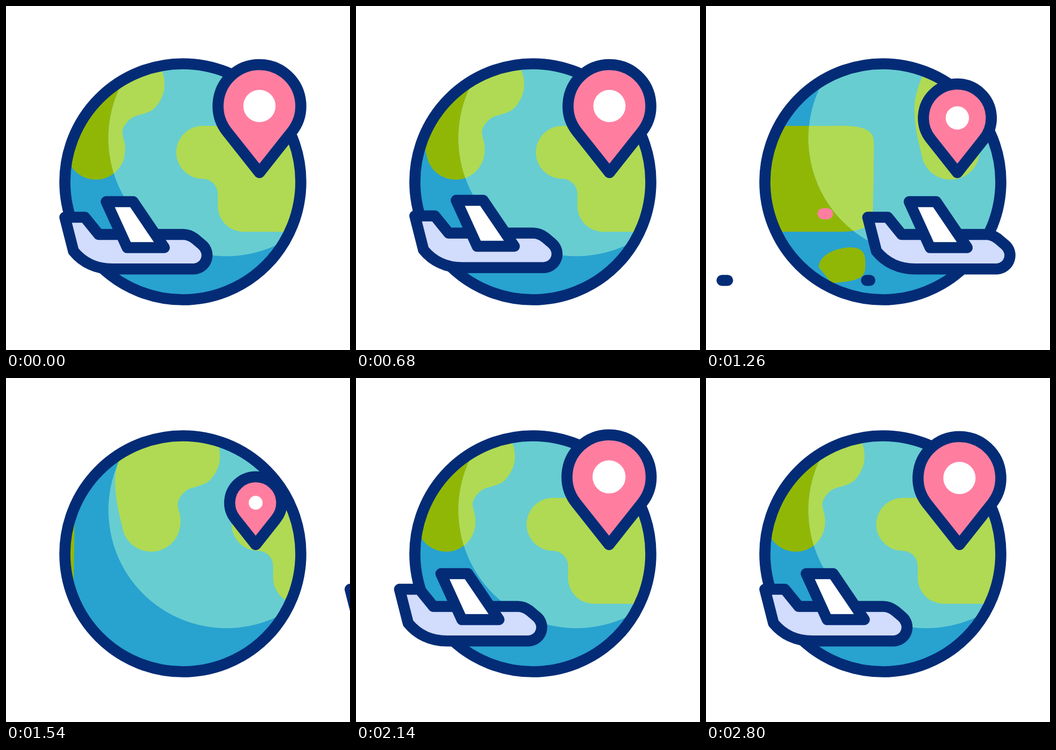
These frames come from a looping animation (640x640 px, 2820 ms). An HTML page:

```html
<!DOCTYPE html>
<html lang="en">
<head>
<meta charset="utf-8">
<title>Travel globe</title>
<style>
  html, body { margin: 0; width: 100%; height: 100%; overflow: hidden; background: #fff; }
  svg { display: block; width: 100vw; height: 100vh; overflow: hidden; }
  .line { stroke: #042c76; stroke-width: 20.6; stroke-linejoin: round; stroke-linecap: round; }
</style>
</head>
<body>
<svg viewBox="0 0 640 640">
  <defs>
    <clipPath id="ball"><circle cx="329" cy="327" r="219.5"/></clipPath>
    <clipPath id="lit"><circle cx="410" cy="246" r="219.5"/></clipPath>
    <g id="land">
      <path d="M134 90C115 130 99 160 100 195S108 255 113 275A54.5 54.5 0 0 0 221.5 265
        C221.5 250 216.5 245 216.5 235S228 209 241 205 260 200 270 195 295 168 295 148 292 128 288 115Z"/>
      <path d="M366 223H550C595 222 628.5 224 628.5 254Q628.5 320 626.5 385C626 418 590 420 560 420
        H442A48 48 0 0 1 394 372V350A28 28 0 0 0 366 321.5A49 49 0 0 1 366 223Z"/>
      <path d="M526 486C526 466 552 450 585 449Q612.5 449 612.5 474V486C612.5 510 592 511 550 516Z"/>
    </g>
    <g id="world">
      <use href="#land"/>
      <use href="#land" x="604"/>
    </g>
  </defs>

  <g clip-path="url(#ball)">
    <rect width="640" height="640" fill="#28a2cf"/>
    <use class="world" href="#world" fill="#91b706"/>
    <g clip-path="url(#lit)">
      <rect width="640" height="640" fill="#67cdd1"/>
      <use class="world" href="#world" fill="#b0da53"/>
    </g>
  </g>
  <circle class="line" cx="329" cy="327" r="219.5" fill="none"/>

  <path id="pin" class="line" fill="#ff7ea0"/>
  <circle id="dot" fill="#fff"/>

  <g id="plane" class="line">
    <path fill="#d2dcfd" d="M109.5 393H146.5L172.5 425H329.5Q341 425 351.5 433L364.5 444
      A25.5 25.5 0 0 1 350 489.3H197.5C167.5 489.3 142.5 477 125.5 456Z"/>
    <path fill="#fff" d="M186.5 364H236.5L294.5 449.5H225.5Z"/>
  </g>

  <!-- Streaks run from right to left. -->
  <g id="streaks" class="line" fill="none">
    <path pathLength="1" d="M167 510.5h-145"/>
    <path pathLength="1" d="M380 510.5h-86"/>
    <path pathLength="1" d="M328.5 386.5h-117" style="stroke:#ff7ea0"/>
  </g>
</svg>
<script>
const LOOP = 2820;
const $ = id => document.getElementById(id);
const worlds = document.querySelectorAll(".world");
let t = 0;

// Eased progress from 0 to 1 between two times; a and c are the
// time handles of the curve, 1/3 and 2/3 giving a plain smooth step.
function move(from, to, a = 1 / 3, c = 2 / 3) {
  const u = Math.min(1, Math.max(0, (t - from) / (to - from)));
  let lo = 0, hi = 1;
  for (let i = 0; i < 24; i++) {
    const s = (lo + hi) / 2, r = 1 - s;
    if (3 * r * s * (r * a + s * c) + s ** 3 < u) lo = s; else hi = s;
  }
  return lo * lo * (3 - 2 * lo);
}

function hop(from, to) {
  const mid = (from + to) / 2;
  return move(from, mid) - move(mid, to);
}

function drawGlobe() {
  const x = 21 * move(0, 900) - 625 * move(900, 2200, 0.25, 0.11);
  worlds.forEach(w => w.setAttribute("transform", `translate(${x} 0)`));
}

function drawPlane() {
  const x = t < 1700 ? 611 * move(1000, 1700) : 630 * (move(1700, 2300, 1 / 3, 0.2) - 1);
  const y = -3.6 * (hop(0, 1000) + hop(2300, LOOP));
  $("plane").setAttribute("transform", `translate(${x} ${y})`);
}

// A circle with two tangents meeting at the tip, scaled about the tip.
function drawPin() {
  const swell = move(900, 1100) - move(2200, 2400);
  const shrink = move(1100, 1400) - move(1900, 2200);
  const s = 1 + 0.06 * swell - 0.432 * shrink;
  const x = 471.5 - 7 * shrink, y = 310, r = 77 * s, d = 124 * s;
  const h = d - r * r / d, w = h * r / Math.sqrt(d * d - r * r);
  $("pin").setAttribute("d", `M${x} ${y}l${-w} ${-h}a${r} ${r} 0 1 1 ${2 * w} 0Z`);
  $("dot").setAttribute("cx", x);
  $("dot").setAttribute("cy", y - d);
  $("dot").setAttribute("r", 46 * s - 16);
}

function drawStreaks() {
  const tail = move(1000, 1335), len = move(870, 1325) - tail;
  const style = $("streaks").style;
  style.display = len > 0.001 ? "" : "none";
  style.strokeDasharray = `${Math.max(0, len)} 2`;
  style.strokeDashoffset = -tail;
}

function draw() {
  t = performance.now() % LOOP;
  drawGlobe();
  drawPlane();
  drawPin();
  drawStreaks();
  requestAnimationFrame(draw);
}
draw();
</script>
</body>
</html>
```
